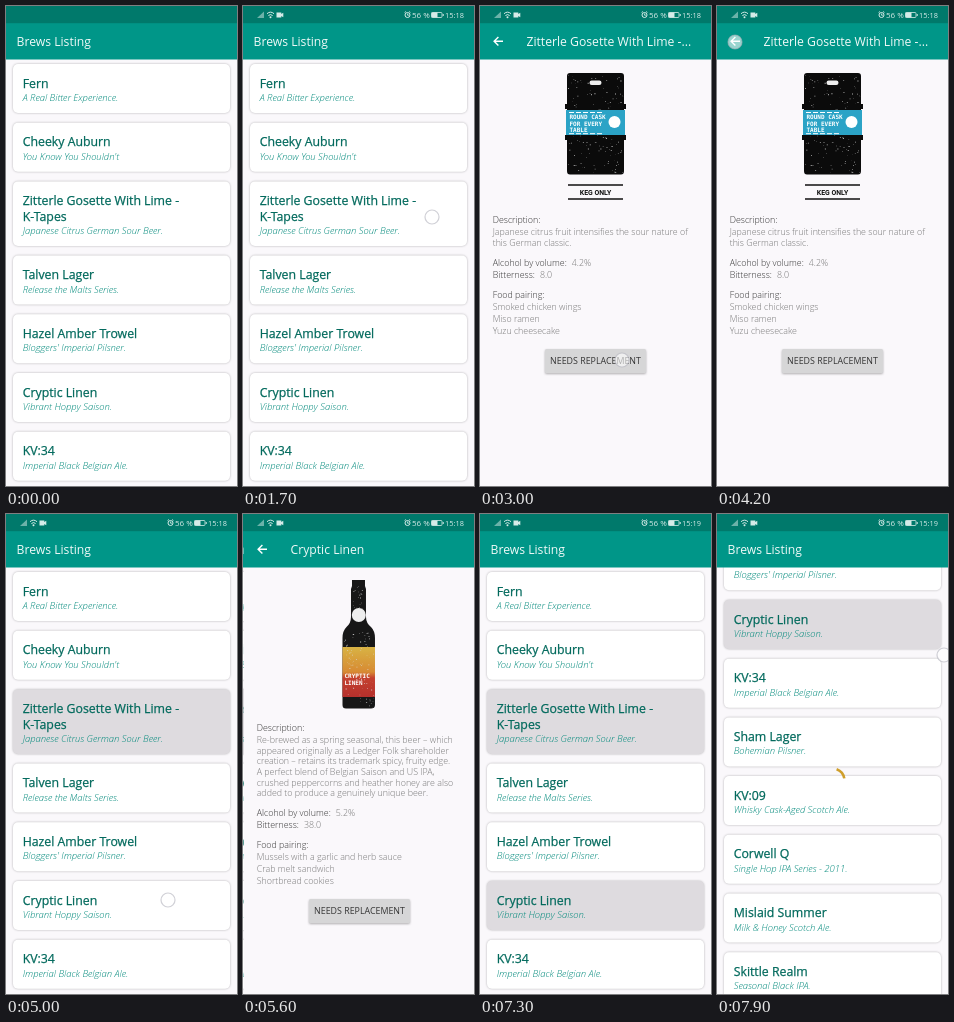
Recreate the animation shown at these times as an HTML page. Size 231x480 px, loop 8 s.

```html
<!DOCTYPE html>
<html lang="en">
<head>
<meta charset="utf-8">
<title>Brews Listing</title>
<style>
  html, body { margin: 0; width: 100%; height: 100%; overflow: hidden; background: #faf8fb; }
  svg { display: block; width: 231px; height: 480px; overflow: hidden; }
  text { font-family: "Open Sans", "Noto Sans", sans-serif; white-space: pre; }

  .bar { font-size: 12.2px; fill: #f0faf8; }
  .name { font-size: 12.3px; fill: #00695c; stroke: #00695c; stroke-width: .25px; }
  .tag { font-size: 9.5px; font-weight: 300; font-style: italic; fill: #00897b; }
  .card { fill: #fff; filter: drop-shadow(0 .8px 1.1px rgba(0, 0, 0, .28)); }
  .body { font-size: 8.85px; font-weight: 300; fill: #777; }
  .label { fill: #333; }
  .button { fill: #d6d6d7; filter: drop-shadow(0 1px 1px rgba(0, 0, 0, .3)); }
  .caption { font-size: 8.85px; fill: #333; text-anchor: middle; }
  .mono { font: bold 6px "DejaVu Sans Mono", monospace; fill: #fff; }
  .keg { font: bold 6.9px Roboto, sans-serif; fill: #111; text-anchor: middle; }
  .status text { font-size: 7.4px; fill: #d5ebe8; }
  .status .level { font-size: 8px; }

  .list, .first, .second { animation: 8s cubic-bezier(.35, .91, .33, .97) infinite; }
  .list { animation-name: list; }
  .first { animation-name: first; }
  .second { animation-name: second; }
  .items { animation: scroll 8s linear infinite; }
  .touch { animation: touch 8s step-end infinite; }
  .status { animation: status 8s step-end infinite; }
  .before { animation: before 8s step-end infinite; }
  .after { animation: after 8s step-end infinite; }
  .spinner { animation: spinner 8s step-end infinite; }
  .mark2 { animation: mark2 8s step-end infinite; }
  .mark5 { animation: mark5 8s step-end infinite; }

  @keyframes list {
    0%, 22.5% { transform: translateX(0); }
    29.4%, 52.75% { transform: translateX(-77px); }
    58%, 63.75% { transform: translateX(0); }
    70.6%, 86.5% { transform: translateX(-77px); }
    91.1%, 100% { transform: translateX(0); }
  }
  @keyframes first {
    0%, 22.5% { transform: translateX(231px); }
    29.4%, 52.75% { transform: translateX(0); }
    58%, 100% { transform: translateX(231px); }
  }
  @keyframes second {
    0%, 63.75% { transform: translateX(231px); }
    70.6%, 86.5% { transform: translateX(0); }
    91.1%, 100% { transform: translateX(231px); }
  }
  @keyframes scroll {
    0%, 92.5% { transform: translateY(0); animation-timing-function: ease-in-out; }
    98.7%, 100% { transform: translateY(-281px); }
  }
  @keyframes touch {
    0% { opacity: 0; transform: translate(189px, 211px); }
    1.2% { opacity: 1; transform: translate(189px, 211px); }
    22.2% { opacity: 0; transform: translate(142px, 354px); }
    37.4% { opacity: 1; transform: translate(142px, 354px); }
    43.7% { opacity: 1; transform: translate(18px, 36px); }
    52.8% { opacity: 0; transform: translate(162px, 386px); }
    58.7% { opacity: 1; transform: translate(162px, 386px); }
    63.5% { opacity: 0; transform: translate(142px, 397px); }
    73.7% { opacity: 1; transform: translate(142px, 397px); }
    81.2% { opacity: 1; transform: translate(18px, 36px); }
    86.5% { opacity: 0; transform: translate(227px, 422px); }
    92.5% { opacity: 1; transform: translate(227px, 422px); animation-timing-function: ease-in-out; }
    98.7%, 100% { opacity: 1; transform: translate(227px, 141px); }
  }
  @keyframes status { 0% { opacity: 0; } 1.2%, 100% { opacity: 1; } }
  @keyframes before { 0% { opacity: 1; } 73.7%, 100% { opacity: 0; } }
  @keyframes after { 0% { opacity: 0; } 73.7%, 100% { opacity: 1; } }
  @keyframes spinner { 0% { opacity: 0; } 98.6%, 100% { opacity: 1; } }
  @keyframes mark2 { 0% { fill: #fff; } 40%, 100% { fill: #dedbdf; } }
  @keyframes mark5 { 0% { fill: #fff; } 77.5%, 100% { fill: #dedbdf; } }
</style>
</head>
<body>
<svg viewBox="0 0 231 480">
  <defs>
    <linearGradient id="label" x2="0" y2="1">
      <stop offset="0" stop-color="#d8b344"/>
      <stop offset=".5" stop-color="#d78a33"/>
      <stop offset=".62" stop-color="#c4402f"/>
      <stop offset="1" stop-color="#b5302c"/>
    </linearGradient>
  </defs>
  <g class="list"></g>
  <g class="first"></g>
  <g class="second"></g>

  <path class="spinner" d="M119.6 255.2A12 12 0 0 1 127.3 264.4" fill="none" stroke="#cf9f2c" stroke-width="2.6"/>

  <g class="status" fill="#d5ebe8">
    <path d="M14 12L21 5.5V12Z" opacity=".5"/>
    <path d="M24 7.7Q27.5 4.6 31 7.7M25.4 9.5Q27.5 7.7 29.6 9.5" fill="none" stroke="#d5ebe8"/>
    <circle cx="27.5" cy="11.2" r="1"/>
    <path d="M33.5 6.5H38.3V8L40.3 6.8V11.2L38.3 10V11.5H33.5Z"/>
    <circle cx="164.5" cy="9" r="2.5" fill="none" stroke="#d5ebe8"/>
    <path d="M164.5 7.5V9.2H166M161.5 6.6L163 5.4M167.5 6.6L166 5.4" fill="none" stroke="#d5ebe8" stroke-width=".8"/>
    <text class="level" x="169" y="11.8">56 %</text>
    <rect x="188.5" y="6.5" width="10.5" height="5" rx="1" fill="none" stroke="#d5ebe8" stroke-width=".8"/>
    <path d="M188.5 6.5H194.5V11.5H188.5ZM199.7 8H200.7V10H199.7Z"/>
    <text class="before" x="202" y="11.6">15:18</text>
    <text class="after" x="202" y="11.6">15:19</text>
  </g>

  <circle class="touch" r="7" fill="#fff" fill-opacity=".6" stroke="#b0b0ba" stroke-opacity=".6" stroke-width="1.2"/>
</svg>
<script>
  const brews = [
    ["Fern", "A Real Bitter Experience."],
    ["Cheeky Auburn", "You Know You Shouldn't"],
    ["Zitterle Gosette With Lime -", "Japanese Citrus German Sour Beer.", "K-Tapes"],
    ["Talven Lager", "Release the Malts Series."],
    ["Hazel Amber Trowel", "Bloggers' Imperial Pilsner."],
    ["Cryptic Linen", "Vibrant Hoppy Saison."],
    ["KV:34", "Imperial Black Belgian Ale."],
    ["Sham Lager", "Bohemian Pilsner."],
    ["KV:09", "Whisky Cask-Aged Scotch Ale."],
    ["Corwell Q", "Single Hop IPA Series - 2011."],
    ["Mislaid Summer", "Milk & Honey Scotch Ale."],
    ["Skittle Realm", "Seasonal Black IPA."]
  ];

  const text = (cls, x, y, s) =>
    `<text class="${cls}" x="${x}" y="${y}">${s.replace("&", "&amp;")}</text>`;
  const rect = (x, y, w, h, extra = "") =>
    `<rect x="${x}" y="${y}" width="${w}" height="${h}" ${extra}/>`;

  let seed = 7;
  const random = () => (seed = (seed * 16807) % 2147483647) / 2147483647;

  function speckles(x, y, w, h, count) {
    let d = "";
    for (let i = 0; i < count; i++) {
      const size = (.3 + random() * .6).toFixed(1);
      d += `M${(x + random() * w).toFixed(1)} ${(y + random() * h).toFixed(1)}h${size}v${size}h-${size}z`;
    }
    return `<path d="${d}" fill="#ddd"/>`;
  }

  function header(title, back) {
    const arrow = '<path d="M23 35.3H14.5M18.4 31L14.1 35.3L18.4 39.6" fill="none" stroke="#fff" stroke-width="1.4"/>';
    return rect(0, 0, 231, 53.5, 'fill="#009688"') + rect(0, 0, 231, 17.2, 'fill="#00796b"') +
      (back ? arrow : "") + text("bar", back ? 46.5 : 10.5, 40, title);
  }

  function list() {
    let y = 58, out = "";
    brews.forEach(([name, tag, more], i) => {
      const extra = more ? 15.5 : 0;
      out += rect(7, y, 217, 49 + extra, `rx="5" class="card mark${i}"`) +
        text("name", 16.7, y + 23.6, name) +
        (more ? text("name", 16.7, y + 39.1, more) : "") +
        text("tag", 16.7, y + 37 + extra, tag);
      y += 58.7 + extra;
    });
    return `<g class="items">${out}</g>` + header("Brews Listing");
  }

  function keg() {
    return '<path d="M90 67H141Q144 67 144 70V98H146V103H144V129H146V134H144V165Q144 168.5 141 168.5H90Q87 168.5 87 165V134H85V129H87V103H85V98H87V70Q87 67 90 67Z" fill="#0b0b0b"/>' +
      speckles(88, 69, 55, 98, 150) +
      rect(109.5, 74.5, 12, 4.5, 'rx="2.2" fill="#eee"') +
      rect(86, 104, 59, 25, 'fill="#2ba3c6"') +
      '<path d="M89 106.5H124M89 127.7H124" stroke="#fff" stroke-width="1" stroke-dasharray="5 2"/>' +
      text("mono", 89.5, 113.2, "ROUND CASK") + text("mono", 89.5, 119.7, "FOR EVERY") +
      text("mono", 89.5, 126.2, "TABLE") +
      '<circle cx="134.5" cy="116" r="6" fill="#fff"/>' +
      '<path d="M88 179H143M88 193H143" stroke="#111" stroke-width="1.4"/>' +
      text("keg", 115.5, 188.6, "KEG ONLY");
  }

  function bottle() {
    return '<path d="M108 66H121V72L122 75V103Q122 109 127 113Q131 117 131 124V191Q131 194.5 127 194.5H102Q98.5 194.5 98.5 191V124Q98.5 117 102.5 113Q107 109 107 103V75L108 72Z" fill="#171717"/>' +
      rect(98.5, 133, 32.5, 50, 'fill="url(#label)"') +
      speckles(109, 68, 11, 40, 25) + speckles(100, 118, 30, 75, 90) +
      '<circle cx="114.8" cy="101" r="7" fill="#eee"/>' +
      text("mono", 100.5, 164, "CRYPTIC") + text("mono", 100.5, 170.5, "LINEN");
  }

  function detail({ title, art, about, abv, bitter, food, abvTop, foodTop, button }) {
    const label = (y, s, value = "") =>
      `<text class="body" x="12.7" y="${y}"><tspan class="label">${s}</tspan><tspan dx="5">${value}</tspan></text>`;
    return rect(0, 0, 231, 480, 'fill="#faf8fb"') + header(title, true) + art +
      label(217.2, "Description:") +
      about.map((s, i) => text("body", 12.7, 229.2 + i * 10.6, s)).join("") +
      label(abvTop, "Alcohol by volume:", abv) +
      label(abvTop + 11.8, "Bitterness:", bitter) +
      label(foodTop, "Food pairing:") +
      food.map((s, i) => text("body", 12.7, foodTop + 12.1 * (i + 1), s)).join("") +
      rect(65, button, 101, 24, 'rx="1.5" class="button"') +
      text("caption", 115.5, button + 15.2, "NEEDS REPLACEMENT");
  }

  const fill = (name, markup) => document.querySelector("." + name).innerHTML = markup;

  fill("list", list());
  fill("first", detail({
    title: "Zitterle Gosette With Lime -...",
    art: keg(),
    about: ["Japanese citrus fruit intensifies the sour nature of", "this German classic."],
    abv: "4.2%", bitter: "8.0",
    food: ["Smoked chicken wings", "Miso ramen", "Yuzu cheesecake"],
    abvTop: 260, foodTop: 292, button: 343
  }));
  fill("second", detail({
    title: "Cryptic Linen",
    art: bottle(),
    about: [
      "Re-brewed as a spring seasonal, this beer – which",
      "appeared originally as a Ledger Folk shareholder",
      "creation – retains its trademark spicy, fruity edge.",
      "A perfect blend of Belgian Saison and US IPA,",
      "crushed peppercorns and heather honey are also",
      "added to produce a genuinely unique beer."
    ],
    abv: "5.2%", bitter: "38.0",
    food: ["Mussels with a garlic and herb sauce", "Crab melt sandwich", "Shortbread cookies"],
    abvTop: 301.7, foodTop: 334, button: 385
  }));
</script>
</body>
</html>
```
